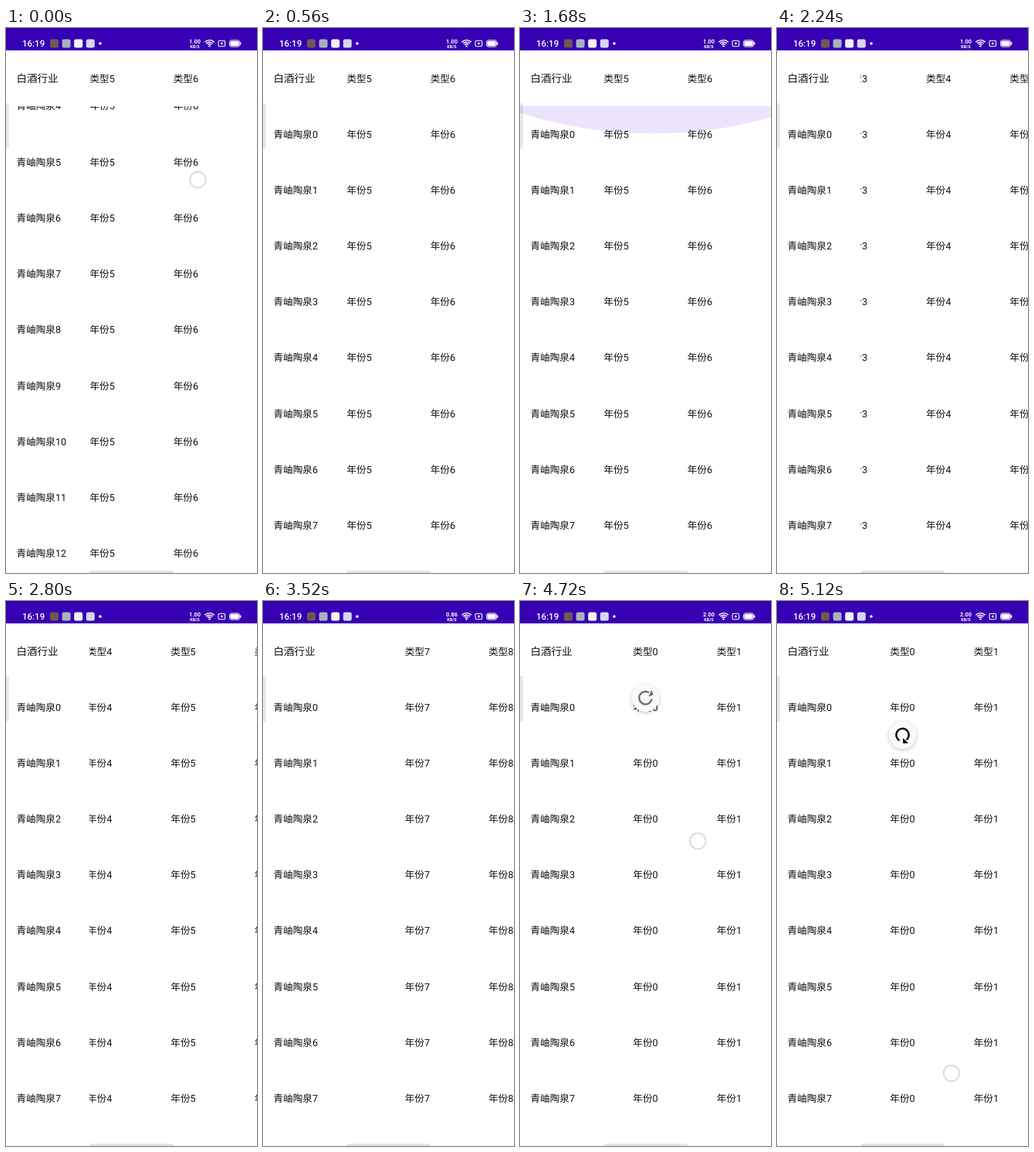
Write an HTML page with a canvas that moves like this. It is 325x704 px and loops after 5200 ms.

```html
<!DOCTYPE html>
<html lang="zh-CN">
<head>
<meta charset="utf-8">
<title>表格滚动</title>
<style>
html, body { margin: 0; width: 100%; height: 100%; overflow: hidden; background: #fff; }
canvas { display: block; width: 325px; height: 704px; }
</style>
</head>
<body>
<canvas id="stage" width="325" height="704"></canvas>
<script>
const g = document.getElementById('stage').getContext('2d');
const W = 325, H = 704, LOOP = 5200, STEP = 80;
const COL = W / 3, ROW = 72.22, BAR = 28.9, TOP = BAR + ROW;
const BASE = ROW / 2 + 4.35;
const FONT = 'Roboto, "Noto Sans CJK SC", "Noto Sans CJK", sans-serif';

// Keys are [time, value]; each stretch eases out.
const scrollY = [[0, 325], [80, 265], [160, 110], [240, 0], [720, 0], [880, 210],
  [1040, 326.2], [1280, 332], [1360, 300], [1440, 190], [1600, 0]];
const scrollX = [[1840, 579.6], [2360, 350], [2800, 474.7], [3520, 721],
  [3840, 440], [4080, 209.3], [4400, 0]];
const spinnerY = [[4480, 83], [5120, 173]];

// Touches: start, end, from x, y, to x, y.
const touches = [
  [0, 160, 248.5, 196, 246, 410],
  [800, 1000, 246, 500, 250, 197],
  [1360, 1520, 250, 240, 248, 470],
  [3920, 4240, 170, 93, 298, 93],
  [4560, 5200, 232, 190, 225, 670]
];

function at(keys, t) {
  if (t <= keys[0][0]) return keys[0][1];
  for (let i = 1; i < keys.length; i++) {
    const [t0, a] = keys[i - 1], [t1, b] = keys[i];
    if (t <= t1) {
      const p = (t - t0) / (t1 - t0);
      return a + (b - a) * p * (1.4 - 0.4 * p);
    }
  }
  return keys[keys.length - 1][1];
}

function text(s, x, y, size = 12.64, align = 'left', color = '#111', weight = 400) {
  g.font = `${weight} ${size}px ${FONT}`;
  g.textRendering = 'geometricPrecision';
  g.textAlign = align;
  g.fillStyle = color;
  g.fillText(s, x, y);
}

function box(x, y, w, h, r, color) {
  g.fillStyle = color;
  g.beginPath();
  g.roundRect(x, y, w, h, r);
  g.fill();
}

function disc(x, y, r, color) {
  g.fillStyle = color;
  g.beginPath();
  g.arc(x, y, r, 0, Math.PI * 2);
  g.fill();
}

function clipped(x, y, w, h, draw) {
  g.save();
  g.beginPath();
  g.rect(x, y, w, h);
  g.clip();
  draw();
  g.restore();
}

function statusBar(t) {
  g.fillStyle = '#3700b3';
  g.fillRect(0, 0, W, BAR);
  text('16:19', 21, 24, 11.5, 'left', '#fff', 500);
  ['#705852', '#a9b3bb', '#f4f4f4', '#d5d8f2'].forEach((c, i) =>
    box(57 + i * 15.6, 14.5, 11, 11, 2.5, c));
  disc(122, 20, 1.8, '#fff');

  const speed = t < 3040 ? '1.00' : t < 4560 ? '0.86' : '2.00';
  text(speed, 244.5, 20, 7.4, 'center', '#fff', 700);
  text('KB/S', 244.5, 25.6, 5.5, 'center', '#fff', 700);

  g.strokeStyle = '#fff';
  g.lineWidth = 1.4;
  for (const r of [3.2, 5.8, 8.4]) {
    g.beginPath();
    g.arc(263.5, 24, r, -Math.PI * 0.76, -Math.PI * 0.24);
    g.stroke();
  }
  disc(263.5, 23.4, 1.2, '#fff');

  g.lineWidth = 1.1;
  g.beginPath();
  g.roundRect(275, 16.2, 8.6, 7.6, 1.8);
  g.stroke();
  disc(279.3, 20, 1.4, '#fff');

  g.lineWidth = 0.9;
  g.beginPath();
  g.roundRect(289.5, 15.8, 13, 8.4, 2.4);
  g.stroke();
  box(290.4, 16.7, 11.2, 6.6, 1.6, '#fff');
  box(303, 18.3, 1.3, 3.4, 0.6, '#fff');
}

function columns(label, y, sx) {
  clipped(COL, 0, W - COL, H, () => {
    for (let c = 0; c < 10; c++) {
      const x = COL * (c + 1.5) - sx;
      if (x > COL - 40 && x < W + 40) text(label + c, x, y, 12.64, 'center');
    }
  });
}

function table(sx, sy) {
  text('白酒行业', 13.5, BAR + BASE + 0.4, 13.54);
  columns('类型', BAR + BASE + 0.4, sx);
  clipped(0, TOP, W, H - TOP, () => {
    for (let r = Math.floor(sy / ROW); r * ROW - sy < H - TOP; r++) {
      const y = TOP + ROW * r - sy + BASE;
      text('青岫陶泉' + r, 13.5, y);
      columns('年份', y, sx);
    }
  });
}

// Overscroll glow under the header.
function glow(t, start, length) {
  const p = (t - start) / length;
  if (p < 0 || p >= 1) return;
  const depth = 36 * Math.sin(Math.PI * Math.min(1, 0.25 + p * 0.75)) ** 0.6;
  clipped(0, TOP, W, H - TOP, () => {
    g.fillStyle = 'rgba(98,0,238,.11)';
    g.beginPath();
    g.ellipse(172, TOP + depth - 414, 487, 414, 0, 0, Math.PI * 2);
    g.fill();
  });
}

function spinner(t) {
  if (t < 4560) return;
  const y = at(spinnerY, t), p = (t - 4480) / 640;
  clipped(0, TOP, W, H - TOP, () => {
    g.translate(162.5, y);
    g.shadowColor = 'rgba(0,0,0,.22)';
    g.shadowBlur = 5;
    g.shadowOffsetY = 1.5;
    disc(0, 0, 18, '#fafafa');
    g.shadowColor = 'transparent';
    g.globalAlpha = Math.min(1, 0.3 + p * 0.7);
    g.rotate((p - 1) * 3);
    g.strokeStyle = '#000';
    g.lineWidth = 2.4;
    g.beginPath();
    g.arc(0, 0, 8.2, Math.PI * 0.66, Math.PI * 2.28);
    g.stroke();
    g.fillStyle = '#000';
    g.beginPath();
    g.moveTo(0.5, 4.2);
    g.lineTo(7.6, 10.6);
    g.lineTo(0.8, 10.9);
    g.fill();
  });
}

function touch(t, [start, end, x0, y0, x1, y1]) {
  if (t < start || t >= end) return;
  const p = (t - start) / (end - start);
  disc(x0 + (x1 - x0) * p, y0 + (y1 - y0) * p, 10.2, 'rgba(255,255,255,.75)');
  g.strokeStyle = '#d2d2d2';
  g.lineWidth = 1.5;
  g.stroke();
}

function draw(t) {
  g.fillStyle = '#fff';
  g.fillRect(0, 0, W, H);
  glow(t, 240, 320);
  glow(t, 1520, 360);
  table(at(scrollX, t), at(scrollY, t));
  statusBar(t);
  spinner(t);
  box(-3, 97, 7, 59, 2, 'rgba(0,0,0,.09)');
  box(108.5, 701, 108.5, 6, 2, '#e4e4e4');
  touches.forEach(k => touch(t, k));
}

const begin = performance.now();
function tick() {
  const t = (performance.now() - begin) % LOOP;
  draw(Math.floor(t / STEP) * STEP);
  requestAnimationFrame(tick);
}
tick();
</script>
</body>
</html>
```
